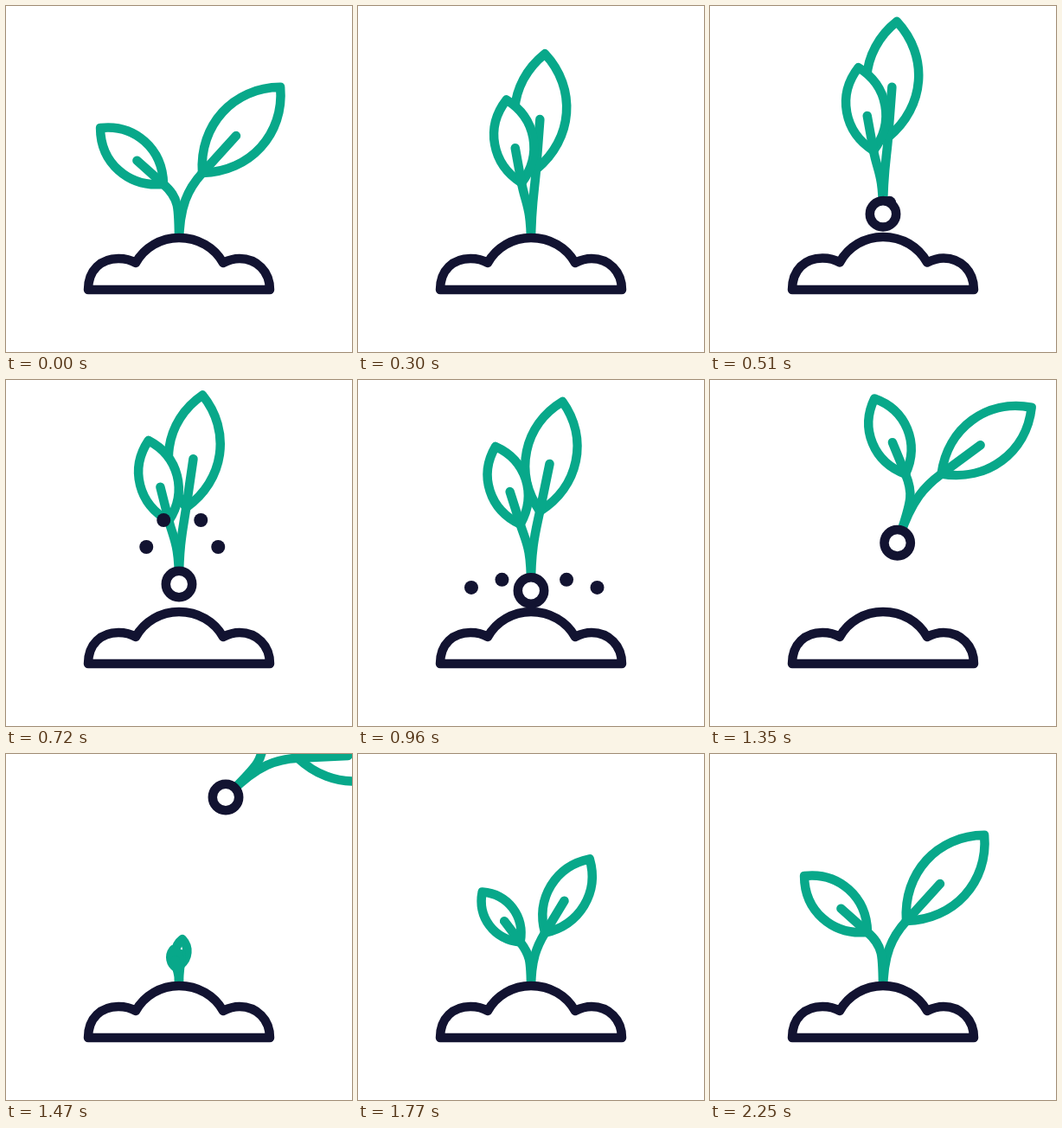
Write an HTML page that moves like this. It is 400 px wide and 400 px high and loops after 2730 ms.

```html
<!DOCTYPE html>
<html lang="en">
<head>
<meta charset="utf-8">
<title>Sprout</title>
<style>
  html, body { margin: 0; width: 100%; height: 100%; overflow: hidden; background: #fff; }
  svg { display: block; width: 100vw; height: 100vh; }
  path, circle { stroke-width: 10.5; stroke-linecap: round; stroke-linejoin: round; }
  .plant path { stroke: #08a88a; fill: #fff; }
  .plant .line { fill: none; }
  .soil { stroke: #121331; fill: #fff; }
  .dot { fill: #121331; stroke: none; }
</style>
</head>
<body>
<svg viewBox="0 0 400 400">
  <g id="old" class="plant"></g>
  <g id="young" class="plant"></g>
  <g id="dots"></g>
  <circle id="root" class="soil" r="15.2"/>
  <path id="mound" class="soil"/>
</svg>
<script>
const LOOP = 2730, STEP = 30, FOLD = 38;
const $ = id => document.getElementById(id);
const clamp = x => Math.max(0, Math.min(1, x));
const rad = deg => deg * Math.PI / 180;
const polar = (len, deg) => [len * Math.sin(rad(deg)), -len * Math.cos(rad(deg))];

function make(tag, cls, parent) {
  const el = document.createElementNS('http://www.w3.org/2000/svg', tag);
  el.setAttribute('class', cls);
  return parent.appendChild(el);
}

function set(el, attrs) {
  for (const name in attrs) el.setAttribute(name, attrs[name]);
}

// Smooth interpolation through [time, value] pairs, without overshoot.
function track(...keys) {
  const slope = i => (keys[i + 1][1] - keys[i][1]) / (keys[i + 1][0] - keys[i][0]);
  const tangent = i => {
    if (i === 0 || i === keys.length - 1) return 0;
    const a = slope(i - 1), b = slope(i);
    return a * b <= 0 ? 0 : 2 * a * b / (a + b);
  };
  return t => {
    const last = keys.length - 1;
    if (t <= keys[0][0]) return keys[0][1];
    if (t >= keys[last][0]) return keys[last][1];
    let i = 0;
    while (t >= keys[i + 1][0]) i++;
    const h = keys[i + 1][0] - keys[i][0], u = (t - keys[i][0]) / h, v = 1 - u;
    return keys[i][1] * v * v * (1 + 2 * u) + keys[i + 1][1] * u * u * (3 - 2 * u)
      + h * u * v * (tangent(i) * v - tangent(i + 1) * u);
  };
}

// side, stem length and angle, stem turn per fold degree, leaf length, angle, width, rib
const LEAVES = [
  { side: 1, stem: 87.3, lean: 18, turn: .37, len: 134, angle: 42.3, w: 40, rib: 58 },
  { side: -1, stem: 72.3, lean: 14.4, turn: .15, len: 97.7, angle: 48.3, w: 30, rib: 41 }
];

// Points of one leaf and its stem: base, stem control, blade controls, tip, rib end.
function pose(s, fold) {
  const dir = s.side * (s.angle - fold), a = rad(dir);
  const [bx, by] = polar(s.stem, s.side * (s.lean - fold * s.turn));
  const at = (x, y) =>
    [bx + x * Math.cos(a) - y * Math.sin(a), by + x * Math.sin(a) + y * Math.cos(a)];
  const low = -.285 * s.len, high = -.725 * s.len;
  return [at(0, 0), at(0, 24), at(-s.w, low), at(-s.w, high), at(0, -s.len),
    at(s.w, high), at(s.w, low), at(0, -s.rib)];
}

function buildPlant(group) {
  return LEAVES.map(spec => ({
    open: pose(spec, 0),
    shut: pose(spec, FOLD),
    stem: make('path', 'line', group),
    blade: make('path', 'blade', group),
    rib: make('path', 'line', group)
  }));
}

// Points morph in straight lines; strokes keep their weight while the plant grows.
function drawPlant(parts, size, fold, foot = 0) {
  for (const { open, shut, stem, blade, rib } of parts) {
    const [base, bend, l1, l2, tip, r2, r1, end] = open.map((p, i) =>
      p.map((v, k) => ((v + (shut[i][k] - v) * fold) * size).toFixed(2)).join(' '));
    set(stem, { d: `M0 ${foot}V0C0 ${-45 * size} ${bend} ${base}` });
    set(blade, { d: `M${base}C${l1} ${l2} ${tip}C${r2} ${r1} ${base}Z` });
    set(rib, { d: `M${base}L${end}` });
  }
}

function drawMound(stretch) {
  const y = v => (328 - (328 - v) * stretch).toFixed(2);
  set($('mound'), {
    d: `M95 328C95 ${y(305)} 110 ${y(292)} 130 ${y(292)}`
      + `C138 ${y(292)} 145 ${y(294)} 150 ${y(297)}`
      + `C160 ${y(279)} 179 ${y(268)} 200 ${y(268)}`
      + `C222 ${y(268)} 241 ${y(279)} 251 ${y(297)}`
      + `C257 ${y(294)} 263 ${y(292)} 270 ${y(292)}`
      + `C290 ${y(292)} 305 ${y(307)} 305 328Z`
  });
}

const fold = track([0, 0], [300, 1], [420, 1.02], [720, .89], [1080, .75], [1200, .69], [1440, 0]);
const unfold = track([1440, 1], [1770, .3], [2250, 0]);
const rise = track([300, 0], [420, 16], [540, 40.5], [720, 42], [960, 38], [1200, 34]);
const rootLag = track([330, 14], [540, 1], [720, 2], [1200, 8]);
const dotSize = track([420, 0], [480, 8], [1140, 8], [1200, 6.5], [1260, 0]);
const crumbs = [
  {
    x: track([420, 0], [720, 41.5], [1080, 87], [1200, 99]),
    y: track([420, 280], [570, 213], [720, 193], [900, 222], [1080, 280], [1200, 299])
  },
  {
    x: track([420, 0], [720, 21.5], [1200, 46]),
    y: track([420, 280], [570, 190], [720, 162], [900, 205], [1080, 285], [1200, 305])
  }
];

const oldPlant = buildPlant($('old'));
const youngPlant = buildPlant($('young'));
const dots = crumbs.flatMap(path => [-1, 1].map(side =>
  ({ path, side, el: make('circle', 'dot', $('dots')) })));

function render(t) {
  const visibility = t < 1650 ? 'visible' : 'hidden';
  const jump = Math.max(0, (t - 1200) / 270);
  const lag = rootLag(t);
  const x = 200 + 54 * jump ** 2;
  const y = 276 - rise(t) + lag - 200 * jump ** 2;
  drawPlant(oldPlant, 1, fold(t), lag);
  set($('old'), {
    transform: `translate(${x} ${y}) rotate(${45 * jump ** 1.5}) translate(0 ${-lag})`,
    visibility
  });
  set($('root'), { cx: x, cy: y, visibility });

  const size = 1 - (1 - clamp((t - 1390) / 860)) ** 2.6;
  drawPlant(youngPlant, size, unfold(t), 6 * (1 - size));
  set($('young'), {
    transform: `translate(200 ${260 + 16 * size})`,
    visibility: size > 0 ? 'visible' : 'hidden'
  });

  for (const { path, side, el } of dots) {
    set(el, { cx: 203.75 + side * path.x(t), cy: path.y(t), r: dotSize(t) });
  }
  drawMound(1 + .04 * Math.sin(Math.PI * clamp((t - 330) / 210)));
}

const start = performance.now();
function tick() {
  const t = (performance.now() - start) % LOOP;
  render(Math.floor(t / STEP) * STEP);
  requestAnimationFrame(tick);
}
render(0);
requestAnimationFrame(tick);
</script>
</body>
</html>
```
